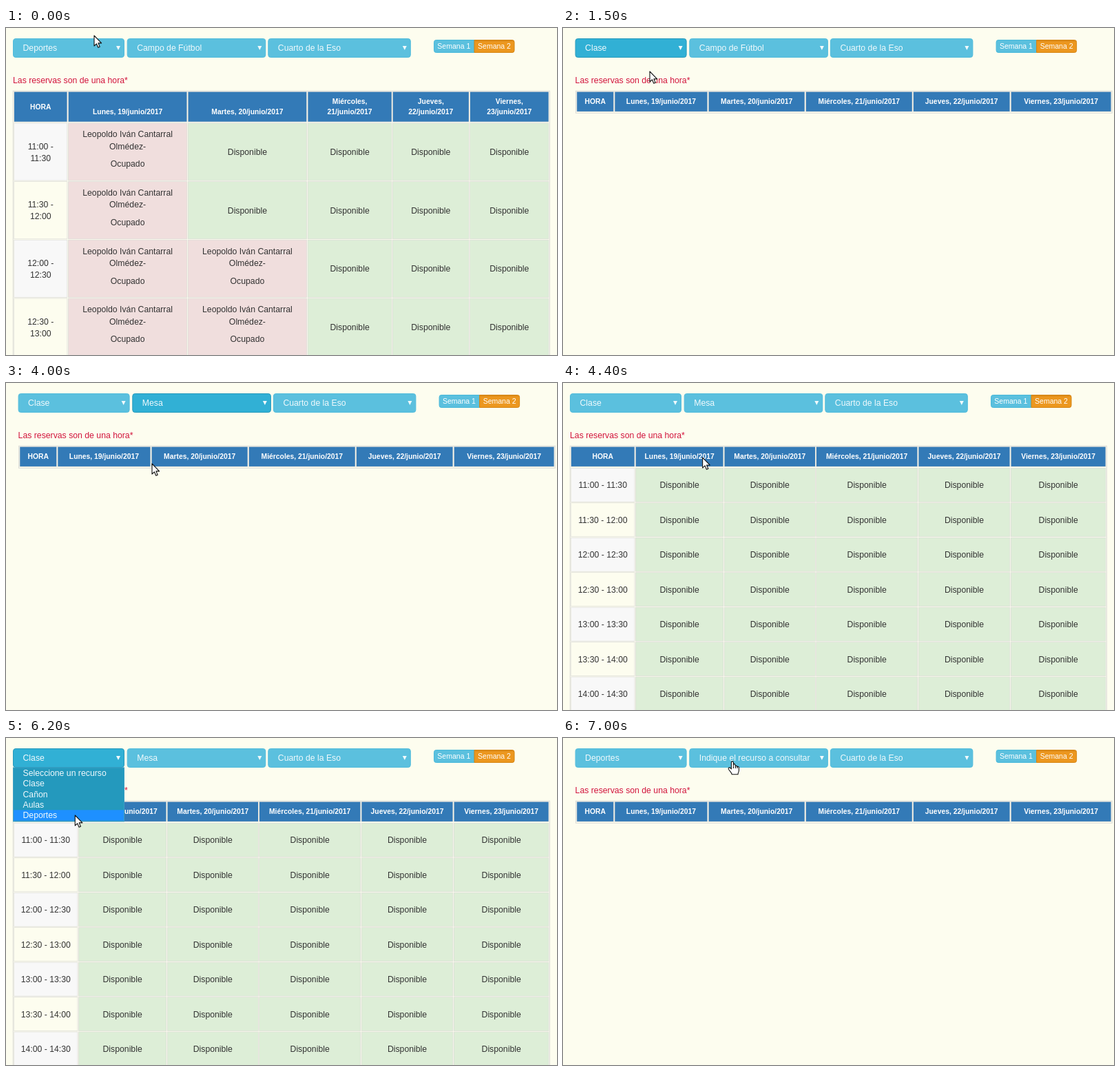
An HTML page with a canvas for the animation above (7100 ms loop, 800 by 474 pixels).

```html
<!DOCTYPE html>
<html lang="es">
<head>
<meta charset="utf-8">
<title>Reservas</title>
<style>
html, body { margin: 0; width: 100%; height: 100%; overflow: hidden; background: #fdfdef; }
canvas { display: block; }
</style>
</head>
<body>
<canvas id="stage" width="800" height="474"></canvas>
<script>
const ctx = document.getElementById('stage').getContext('2d');
const LOOP = 7100, STEP = 100;
const FACE = '"Liberation Sans", Arial, sans-serif';
const BODY = `12.25px ${FACE}`, HEAD = `bold 10.35px ${FACE}`, SMALL = `10.5px ${FACE}`;
const PAGE = '#fdfdef', FREE = '#ddeed7', BUSY = '#f0dedd', LINE = '#dcdcd8';
const PROMPT = 'Indique el recurso a consultar';
const TYPES = ['Seleccione un recurso', 'Clase', 'Cañon', 'Aulas', 'Deportes'];
const ITEMS = [PROMPT, 'Mesa'];
const DAYS = ['Lunes', 'Martes', 'Miércoles', 'Jueves', 'Viernes'];
const PERSON = ['Leopoldo Iván Cantarral', 'Olmédez-', 'Ocupado'];
const BOXES = [[10, 162], [175.7, 201.6], [380.3, 207.5]];
const ROW = 15.3;

// Left and right edges of the six columns for each layout
const COLS = {
  sports: [[12, 88.5], [90.8, 262.4], [264.6, 436.2], [438.5, 559.7], [561.8, 671.8], [674, 787.6]],
  empty: [[20.3, 73.2], [75.4, 209.4], [211.7, 350.6], [352.9, 506.7], [508.9, 648.5], [650.8, 795.5]],
  desk: [[12, 103.6], [105.8, 232.4], [234.6, 366], [368, 514.3], [516.5, 648.5], [650.7, 787.6]]
};

// Page states; focus and open hold the index of a select
const SCENES = [
  { at: 0, view: 'sports', picks: ['Deportes', 'Campo de Fútbol'] },
  { at: 400, focus: 0 },
  { at: 600, open: 0 },
  { at: 1500, view: 'empty', picks: ['Clase', 'Campo de Fútbol'], open: -1 },
  { at: 2000, picks: ['Clase', PROMPT], focus: -1 },
  { at: 2200, focus: 1 },
  { at: 2500, open: 1 },
  { at: 3500, picks: ['Clase', 'Mesa'], open: -1 },
  { at: 4100, view: 'desk', focus: -1 },
  { at: 4700, focus: 0 },
  { at: 4900, open: 0 },
  { at: 6300, view: 'empty', picks: ['Deportes', 'Mesa'], open: -1 },
  { at: 6700, focus: -1 },
  { at: 7000, picks: ['Deportes', PROMPT] }
];

// Pointer path: time, x, y
const PATH = [
  [0, 128, 11], [200, 128, 11], [500, 130, 31], [800, 130, 34], [1200, 126, 63],
  [1600, 126, 63], [2200, 233, 31], [2300, 234, 32], [2500, 234, 32], [2800, 218, 55],
  [3100, 212, 66], [3500, 212, 66], [4000, 212, 117], [4300, 212, 117], [4800, 122, 31],
  [4900, 122, 32], [5200, 120, 59], [5800, 118, 68], [6000, 101, 112], [6300, 100, 112],
  [6500, 106, 108], [7000, 246, 34]
];

function sceneAt(t) {
  const s = { focus: -1, open: -1 };
  for (const c of SCENES) if (c.at <= t) Object.assign(s, c);
  return s;
}

function pointerAt(t) {
  const i = PATH.findIndex(p => p[0] > t);
  if (i < 0) return PATH[PATH.length - 1].slice(1);
  const [t0, x0, y0] = PATH[i - 1], [t1, x1, y1] = PATH[i];
  const u = (t - t0) / (t1 - t0), k = u * u * (3 - 2 * u);
  return [x0 + (x1 - x0) * k, y0 + (y1 - y0) * k];
}

function rect(x, y, w, h, color) {
  ctx.fillStyle = color;
  ctx.fillRect(x, y, w, h);
}

function round(x, y, w, h, r, fill, stroke) {
  ctx.beginPath();
  ctx.roundRect(x, y, w, h, r);
  ctx.fillStyle = fill;
  ctx.fill();
  if (stroke) {
    ctx.strokeStyle = stroke;
    ctx.lineWidth = 1;
    ctx.stroke();
  }
}

// y is the middle of the capitals
function text(s, x, y, font, color, align = 'left') {
  ctx.font = font;
  ctx.fillStyle = color;
  ctx.textAlign = align;
  ctx.fillText(s, x, y + (font === BODY ? 4.3 : 3.8));
}

function cell([l, r], y, h, fill) {
  rect(l - .7, y - .7, r - l + 1.4, h + 1.4, LINE);
  rect(l, y, r - l, h, fill);
}

function lines(list, col, ys, font, color) {
  list.forEach((s, i) => text(s, (col[0] + col[1]) / 2, ys[i], font, color, 'center'));
}

const clock = n => `${11 + (n >> 1)}:${n % 2 ? '30' : '00'}`;

function drawHeader(cols, view) {
  const tall = view === 'sports';
  cols.forEach((col, i) => {
    cell(col, 92.7, tall ? 43 : 28.2, '#337ab7');
    const date = `${18 + i}/junio/2017`, day = DAYS[i - 1] + ',';
    if (!i) lines(['HORA'], col, [tall ? 113.7 : 106.5], HEAD, '#fff');
    else if (tall && i > 2) lines([day, date], col, [106.5, 121.2], HEAD, '#fff');
    else lines([`${day} ${date}`], col, [tall ? 121.2 : 106.5], HEAD, '#fff');
  });
}

function drawTable(view) {
  const cols = COLS[view], sports = view === 'sports';
  const left = cols[0][0] - 2, width = cols[5][1] + 2 - left;
  const bottom = view === 'empty' ? 123.3 : 490;
  ctx.strokeStyle = LINE;
  ctx.lineWidth = 1;
  ctx.strokeRect(left + .2, 91.2, width - .4, bottom - 91.2);
  drawHeader(cols, view);
  if (view === 'empty') return;
  const top = sports ? 138.2 : 123.7, pitch = sports ? 84.7 : 50.45;
  for (let n = 0; top + n * pitch < 474; n++) {
    const y = top + n * pitch, h = pitch - 2.2, mid = y + h / 2 + .3;
    cols.forEach((col, i) => {
      const busy = sports && (i === 1 || (i === 2 && n > 1));
      cell(col, y, h, !i ? (n % 2 ? PAGE : '#f8f8f8') : busy ? BUSY : FREE);
      if (!i && sports) lines([clock(n) + ' -', clock(n + 1)], col, [mid - 8.5, mid + 8.7], BODY, '#333');
      else if (!i) lines([`${clock(n)} - ${clock(n + 1)}`], col, [mid], BODY, '#333');
      else if (busy) lines(PERSON, col, [mid - 25.7, mid - 8.5, mid + 17.2], BODY, '#333');
      else lines(['Disponible'], col, [mid], BODY, '#333');
    });
  }
}

function drawSelect(i, label, dark, dx) {
  const [x, w] = BOXES[i], l = x + dx;
  round(l + .5, 15.5, w - 1, 27, 3.5, dark ? '#31b0d5' : '#5bc0de', dark ? '#269abc' : '#52bcdc');
  text(label, l + 14.5, 29, BODY, '#f0f9fc');
  const ax = l + w - 9;
  ctx.beginPath();
  ctx.moveTo(ax - 3, 26);
  ctx.lineTo(ax + 3, 26);
  ctx.lineTo(ax, 32);
  ctx.fillStyle = '#f0f9fc';
  ctx.fill();
}

function drawList(i, label, dx, py) {
  const list = i ? ITEMS : TYPES, [x, w] = BOXES[i], l = x + dx;
  const h = list.length * ROW + 1.4;
  const hot = py < 44 ? list.indexOf(label) : Math.min(list.length - 1, Math.floor((py - 44) / ROW));
  rect(l, 42.8, w, h, '#2499bd');
  rect(l + 1, 43.2 + hot * ROW, w - 2, ROW, '#1e90ff');
  ctx.strokeStyle = '#3c9fc4';
  ctx.lineWidth = 1;
  ctx.strokeRect(l + .5, 43, w - 1, h);
  list.forEach((s, n) => text(s, l + 14.5, 50.6 + n * ROW, BODY, '#f0f9fc'));
}

function drawWeeks(dx) {
  const x = 621 + dx;
  round(x + .5, 17.5, 58.5, 18, [3, 0, 0, 3], '#5bc0de', '#46b8da');
  round(x + 59, 17.5, 58, 18, [0, 3, 3, 0], '#ec971f', '#d58512');
  rect(x + 59.5, 18, 57, 1.5, '#dc8a19');
  text('Semana 1', x + 29.3, 26.6, SMALL, '#fff', 'center');
  text('Semana 2', x + 88, 26.6, SMALL, '#fff', 'center');
}

const ARROW = new Path2D('M0 0V15L3.4 11.8L5.8 17.2L8.2 16.2L5.9 10.9H10.6Z');
const HAND = new Path2D('M-1.6 1.4C-1.6-.6 1.4-.6 1.4 1.4V6.2C2-.0 4.4 5.4 4.4 7C5.2 5.8 7 6.3 7 7.8' +
  'C8 6.8 9.4 7.6 9.4 9V13.2C9.4 15 8 16 8 18.8H-.8C-.8 16.6-3.4 14.6-5.6 11.2C-6.6 9.2-4.2 8-2.8 9.6L-1.6 11Z');

function drawPointer(x, y, hand) {
  ctx.save();
  ctx.translate(x, y);
  ctx.lineJoin = 'round';
  ctx.lineWidth = 1.1;
  ctx.fillStyle = '#fff';
  ctx.strokeStyle = '#111';
  const shape = hand ? HAND : ARROW;
  ctx.fill(shape);
  ctx.stroke(shape);
  if (hand) {
    ctx.beginPath();
    for (const k of [1.4, 4.4, 7]) {
      ctx.moveTo(k, 7);
      ctx.lineTo(k, 10);
    }
    ctx.stroke();
  }
  ctx.restore();
}

function draw(t) {
  const s = sceneAt(t), [px, py] = pointerAt(t);
  const dx = s.view === 'empty' ? 7.6 : 0;
  rect(0, 0, 800, 474, PAGE);
  text('Las reservas son de una hora*', 10 + dx, 75.3, BODY, '#d2143c');
  drawTable(s.view);
  [...s.picks, 'Cuarto de la Eso'].forEach((label, i) => drawSelect(i, label, s.focus === i, dx));
  drawWeeks(dx);
  if (s.open >= 0) drawList(s.open, s.picks[s.open], dx, py);
  const over = BOXES.some(([x, w]) => px > x + dx && px < x + dx + w);
  drawPointer(px, py, over && py > 15 && py < 43);
}

const start = performance.now();
function tick() {
  const t = (performance.now() - start) % LOOP;
  draw(Math.floor(t / STEP) * STEP);
  requestAnimationFrame(tick);
}
tick();
</script>
</body>
</html>
```
